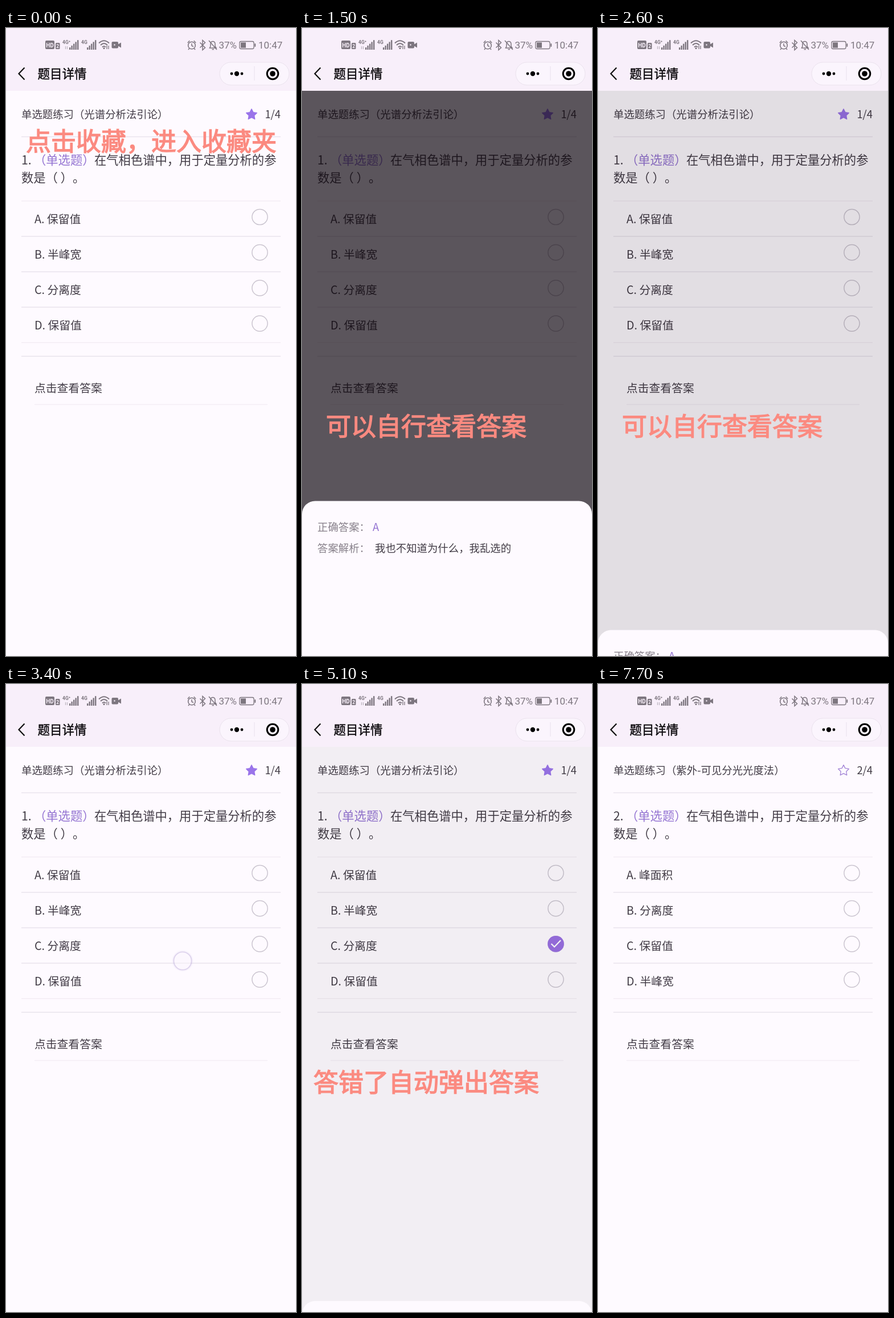
An HTML page for the animation above (8 s loop, 509x1100 px).

```html
<!DOCTYPE html>
<html lang="zh-CN">
<head>
<meta charset="utf-8">
<title>题目详情</title>
<style>
  html, body { margin: 0; width: 100%; height: 100%; overflow: hidden; background: #fefaff; }
  svg { display: block; width: 100vw; height: 100vh; }
  text {
    font-family: "Noto Sans CJK SC", "Noto Sans CJK", "Noto Sans", sans-serif;
    fill: #423c46; white-space: pre;
    text-spacing-trim: space-all; font-kerning: none; font-feature-settings: "chws" 0, "halt" 0;
  }
  .status text { font-family: Roboto, sans-serif; fill: #7d767f; }
  .caption { font-size: 44px; fill: #fb8a80; stroke: #fb8a80; stroke-width: 1.4px; }
  .title { font-size: 21.5px; fill: #0c0a0d; stroke: #0c0a0d; stroke-width: 0.4px; }
  .small { font-size: 18.4px; }
  .question { font-size: 21.3px; }
  .option { font-size: 19.8px; }
  .accent { fill: #9474d2; }
  .muted { fill: #87808a; }
</style>
</head>
<body>
<svg id="stage" viewBox="0 0 509 1100" preserveAspectRatio="none"></svg>
<script>
const LOOP = 8000, STEP = 100;
const PANEL_TOP = 815, PANEL_HEIGHT = 285;
const stage = document.getElementById('stage');

function add(parent, tag, attrs = {}, content) {
  const node = document.createElementNS('http://www.w3.org/2000/svg', tag);
  for (const key in attrs) node.setAttribute(key, attrs[key]);
  if (content !== undefined) node.textContent = content;
  parent.appendChild(node);
  return node;
}
const group = (parent, attrs) => add(parent, 'g', attrs);
const rect = (parent, x, y, width, height, fill, more) =>
  add(parent, 'rect', { x, y, width, height, fill, ...more });
const circle = (parent, cx, cy, r, attrs) => add(parent, 'circle', { cx, cy, r, ...attrs });
const label = (parent, x, y, cls, content, more) =>
  add(parent, 'text', { x, y, class: cls, ...more }, content);
const line = (parent, d, stroke, width, more) =>
  add(parent, 'path', { d, fill: 'none', stroke, 'stroke-width': width, ...more });
const show = (node, visible) => node.setAttribute('display', visible ? 'inline' : 'none');

function starPath(cx, cy, outer, inner) {
  const points = Array.from({ length: 10 }, (_, i) => {
    const r = i % 2 ? inner : outer, a = i * Math.PI / 5 - Math.PI / 2;
    return (cx + r * Math.cos(a)).toFixed(2) + ' ' + (cy + r * Math.sin(a)).toFixed(2);
  });
  return 'M' + points.join('L') + 'Z';
}

function buildQuestion({ number, topic, options, starred }) {
  const g = group(stage);
  label(g, 27, 157.5, 'small', `单选题练习（${topic}）`);
  label(g, 482, 157.5, 'small', `${number}/4`, { 'text-anchor': 'end' });
  add(g, 'path', {
    d: starPath(431, 151.7, 9.8, 5),
    fill: starred ? '#9a74ea' : 'none', stroke: starred ? '#9a74ea' : '#a283d6',
    'stroke-width': 1.3, 'stroke-linejoin': 'round'
  });
  label(g, 27, 238.5, 'question', `${number}.`);
  label(g, 49, 238.5, 'question accent', '（单选题）');
  label(g, 155, 238.5, 'question', '在气相色谱中，用于定量分析的参');
  label(g, 27, 269.5, 'question', '数是（ ）。');
  options.forEach((name, i) => {
    const y = 331 + i * 62.2;
    label(g, 50, y + 10.5, 'option', `${'ABCD'[i]}. ${name}`);
    circle(g, 445.5, y, 13.6, { fill: 'none', stroke: '#cbc5d0', 'stroke-width': 1.5 });
  });
  return g;
}

function buildPage() {
  rect(stage, 0, 0, 509, 1100, '#fefaff');
  [190.5, 365, 427, 489, 575].forEach(y => line(stage, `M27 ${y}H482`, '#e9e3ed', 1.6));
  [303, 551].forEach(y => line(stage, `M27 ${y}H482`, '#f3edf5', 1.5));
  line(stage, 'M50 659.5H459', '#f3edf5', 1.5);
  label(stage, 50, 637.5, 'option', '点击查看答案');
}

function buildPanel() {
  const g = group(stage);
  rect(g, 0, 0, 509, 330, '#fefaff', { rx: 23 });
  label(g, 27, 53, 'small muted', '正确答案：');
  label(g, 124, 53, 'small accent', 'A');
  label(g, 27, 90, 'small muted', '答案解析：');
  label(g, 128, 90, 'small', '我也不知道为什么，我乱选的');
  return g;
}

function buildStatus() {
  const ink = '#7d767f', g = group(stage, { class: 'status' });
  rect(g, 69, 22, 16, 15, ink, { rx: 2 });
  label(g, 77, 33.5, '', 'HD', { 'font-size': 10, 'font-weight': 700, 'text-anchor': 'middle', style: 'fill:#f8effa' });
  rect(g, 87, 26, 7.5, 11, ink, { rx: 1.5 });
  label(g, 90.8, 34.8, '', '2', { 'font-size': 8.5, 'font-weight': 700, 'text-anchor': 'middle', style: 'fill:#f8effa' });
  [[99, '4G⁺', 111], [132, '4G', 142]].forEach(([x, name, bars]) => {
    label(g, x, 27.5, '', name, { 'font-size': 8.5, 'font-weight': 700 });
    for (let i = 0; i < 5; i++) rect(g, bars + i * 3.5, 34 - i * 3.2, 2.4, 4 + i * 3.2, ink);
  });
  line(g, 'M104.5 32V37M107.5 32V37', '#bdb5bf', 1.2);
  line(g, 'M163 26.5Q172 18 181 26.5M166 30Q172 24 178 30M169 33.5Q172 30.5 175 33.5', ink, 1.9);
  circle(g, 172, 35.5, 1.6, { fill: ink });
  line(g, 'M177 31V37M180 31V37', ink, 1.3);
  rect(g, 185.5, 24, 11.5, 11.5, ink, { rx: 2 });
  add(g, 'path', { d: 'M196 29L202 25.5V34.5L196 31Z', fill: ink });
  circle(g, 190.5, 29.5, 1.2, { fill: '#f8effa' });

  circle(g, 326, 30.5, 6.3, { fill: 'none', stroke: ink, 'stroke-width': 1.6 });
  line(g, 'M326 27V31L329 32.5M318.8 26L322.3 22.3M333.2 26L329.7 22.3M321.5 36L320 38M330.5 36L332 38', ink, 1.5);
  line(g, 'M340.5 25.5L349.5 34.5L345 38.5V21.5L349.5 25.5L340.5 34.5', ink, 1.5);
  line(g, 'M357.5 35H369L367 32V27.5Q366.5 23.5 363 23.5Q359.5 23.5 359 27.5V32ZM361.5 37.5H365M356 22L370 38', ink, 1.5);
  label(g, 373.5, 36, '', '37%', { 'font-size': 17 });
  rect(g, 410, 23.5, 25, 13, 'none', { rx: 2.5, stroke: ink, 'stroke-width': 1.3 });
  rect(g, 412, 25.3, 9, 9.4, ink);
  rect(g, 436.2, 27, 2, 6, ink, { rx: 1 });
  label(g, 443, 36, '', '10:47', { 'font-size': 17 });
}

function buildNav() {
  rect(stage, 0, 0, 509, 110, '#f8effa');
  buildStatus();
  line(stage, 'M32.5 69.5L22.5 80L32.5 90.5', '#111', 2.2);
  label(stage, 55.5, 88, 'title', '题目详情');
  rect(stage, 375, 60, 122, 40, '#fbf5fd', { rx: 20, stroke: '#ebe3ee', 'stroke-width': 1 });
  line(stage, 'M436 67V92', '#e9e1ec', 1);
  [[396, 2.4], [405, 4.2], [414, 2.4]].forEach(([x, r]) => circle(stage, x, 80, r, { fill: '#000' }));
  circle(stage, 468, 80, 9.8, { fill: 'none', stroke: '#000', 'stroke-width': 3 });
  circle(stage, 468, 80, 4.8, { fill: '#000' });
}

function buildToast() {
  const g = group(stage);
  rect(g, 169, 520, 171, 171, '#111', { rx: 7, 'fill-opacity': 0.7 });
  const spinner = group(g);
  for (let i = 0; i < 12; i++) {
    rect(spinner, -2, -24, 4, 13, '#fff', { rx: 2, transform: `rotate(${i * 30})`, opacity: 0.25 + i * 0.06 });
  }
  label(g, 254.5, 651, '', '加载中', { 'font-size': 21, 'text-anchor': 'middle', style: 'fill:#fff' });
  return { g, spinner };
}

function buildTouch() {
  const g = group(stage);
  circle(g, 0, 0, 17, { fill: 'none', stroke: '#d3c4e8', 'stroke-width': 3, 'stroke-opacity': 0.14 });
  circle(g, 0, 0, 14.8, { fill: '#fbf4fc', 'fill-opacity': 0.45 });
  circle(g, 0, 0, 15.6, { fill: 'none', stroke: '#b9a6d8', 'stroke-width': 1.8, 'stroke-opacity': 0.45 });
  return g;
}

buildPage();
const first = buildQuestion({ number: 1, topic: '光谱分析法引论', options: ['保留值', '半峰宽', '分离度', '保留值'], starred: true });
const second = buildQuestion({ number: 2, topic: '紫外-可见分光光度法', options: ['峰面积', '分离度', '保留值', '半峰宽'], starred: false });
const check = group(stage);
circle(check, 445.5, 455.2, 14.3, { fill: '#996fe2' });
line(check, 'M437.5 455L443 460.5L454 449', '#fff', 2.2);
const shade = rect(stage, 0, 110, 509, 990, '#0b030b');
const panel = buildPanel();
buildNav();
const toast = buildToast();
const captions = [
  [35, 214.5, 0, 800, '点击收藏，进入收藏夹'],
  [42, 713.5, 1000, 2700, '可以自行查看答案'],
  [20, 713.5, 3800, 5400, '答错了自动弹出答案']
].map(([x, y, from, to, content]) => ({ from, to, node: label(stage, x, y, 'caption', content) }));
const touch = buildTouch();

// x, y, start, end; each touch fades over its last 200 ms
const touches = [[131, 655, 1000, 1400], [395, 742, 2300, 2600], [310, 485, 3300, 3600], [222, 771, 4700, 5100]];

const within = (t, from, to) => t >= from && t < to;
function easeOut(t, start, duration) {
  const u = Math.min(1, Math.max(0, (t - start) / duration));
  return 1 - (1 - u) ** 2;
}
const openness = t => t < 3000
  ? easeOut(t, 1265, 300) - easeOut(t, 2450, 250)
  : easeOut(t, 3680, 300) - easeOut(t, 4915, 250);

function render(t) {
  const open = openness(t);
  shade.setAttribute('opacity', 0.7 * open);
  panel.setAttribute('transform', `translate(0 ${PANEL_TOP + PANEL_HEIGHT * (1 - open)})`);
  show(panel, open > 0);

  show(first, t < 6000);
  show(second, t >= 6000);
  show(check, within(t, 3600, 6000));
  captions.forEach(c => show(c.node, within(t, c.from, c.to)));

  show(toast.g, within(t, 5600, 6300));
  const turn = Math.floor((Math.min(t, 6000) - 5600) / 83) * 30;
  toast.spinner.setAttribute('transform', `translate(254.5 589) rotate(${turn})`);

  const active = touches.find(([, , from, to]) => within(t, from, to));
  show(touch, active);
  if (active) {
    const [x, y, , end] = active;
    touch.setAttribute('transform', `translate(${x} ${y})`);
    touch.setAttribute('opacity', Math.min(1, (end - t) / 200));
  }
}

const origin = performance.now();
function tick() {
  const t = Math.max(0, performance.now() - origin) % LOOP;
  render(Math.floor(t / STEP) * STEP);
  requestAnimationFrame(tick);
}
tick();
</script>
</body>
</html>
```
